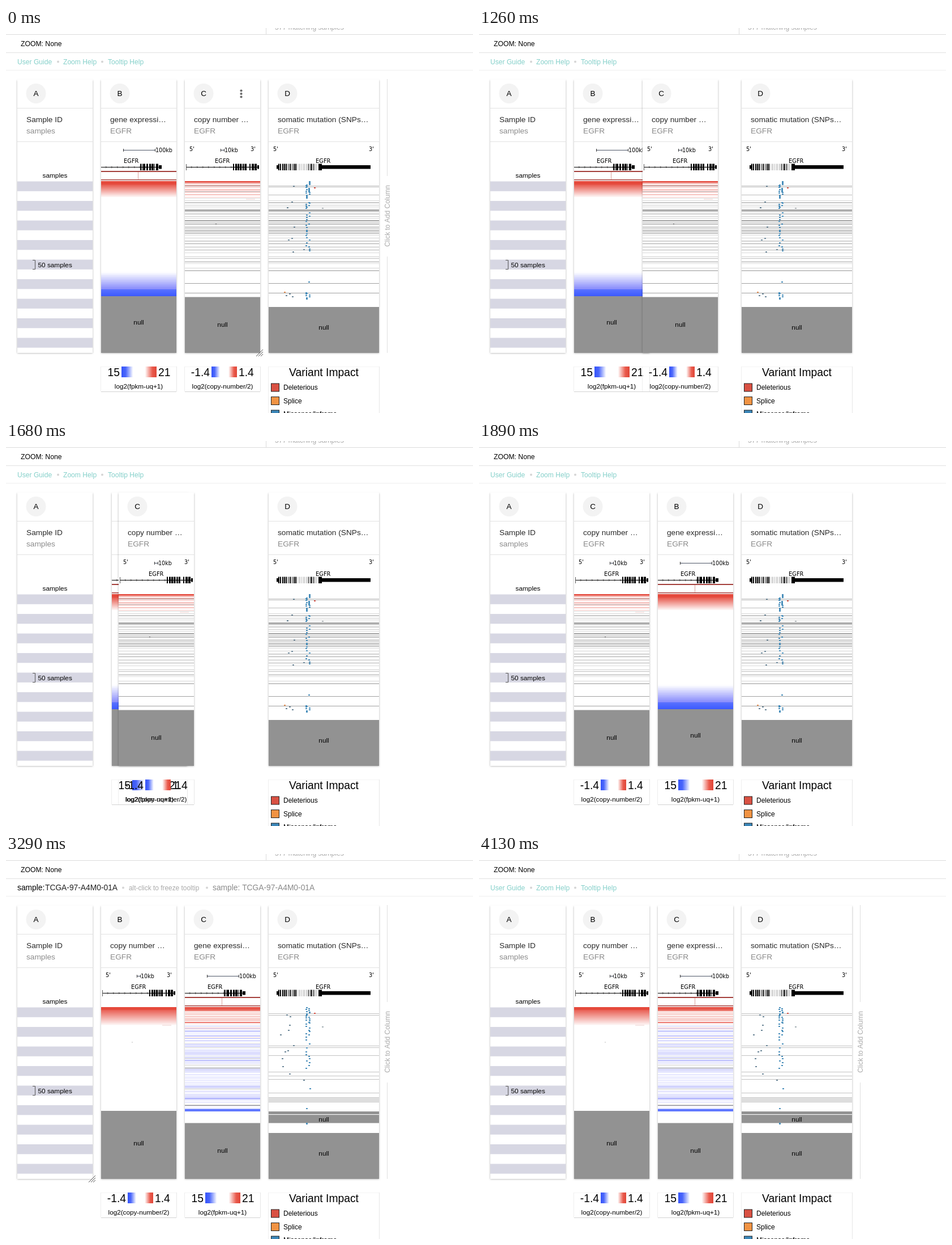
Animation, 825 px wide and 679 px high, one loop 4200 ms. Source, as an HTML page with a canvas:

```html
<!DOCTYPE html>
<html lang="en">
<head>
<meta charset="utf-8">
<title>Column reorder</title>
<style>
html, body { margin: 0; width: 100%; height: 100%; overflow: hidden; background: #fff; }
canvas { display: block; }
</style>
</head>
<body>
<canvas id="stage" width="825" height="679"></canvas>
<script>
const ctx = document.getElementById('stage').getContext('2d');
const LOOP = 4200, STEP = 70;
const DRAG = 1050, DROP = 1820, SORTED = 3150, TIP_ON = 3220, TIP_OFF = 3570;
const UI = '"Liberation Sans", Arial, sans-serif';
const TRACK = '"DejaVu Sans", Verdana, sans-serif';
const TOP = 270, BOTTOM = 573;
const NULL = '#929292';
const RED = [229, 73, 60], BLUE = [56, 86, 255], LILAC = [72, 78, 250], GRAY = [120, 120, 120];

function rect(x, y, w, h, color) {
  ctx.fillStyle = color;
  ctx.fillRect(x, y, w, h);
}

function text(s, x, y, size, color = '#000', align = 'left', font = UI) {
  ctx.font = `${size}px ${font}`;
  ctx.textAlign = align;
  ctx.fillStyle = color;
  ctx.fillText(s, x, y);
}

function dot(x, y, r, color) {
  ctx.fillStyle = color;
  ctx.beginPath();
  ctx.arc(x, y, r, 0, 7);
  ctx.fill();
}

function path(points, color, width = 1) {
  ctx.strokeStyle = color;
  ctx.lineWidth = width;
  ctx.beginPath();
  points.forEach(([x, y]) => ctx.lineTo(x, y));
  ctx.stroke();
}

function random(seed) {
  seed *= 7919;
  return () => (seed = seed * 16807 % 2147483647) / 2147483647;
}

// Mix of white and an rgb colour
const tint = (rgb, k) => `rgb(${rgb.map(c => Math.round(255 + (c - 255) * k))})`;

function fade(w, from, to, rgb, k0, k1, step) {
  for (let y = from; y < to; y += step)
    rect(0, y, w, Math.min(step, to - y), tint(rgb, k0 + (k1 - k0) * (y - from) / (to - from)));
}

// One-pixel rows at random gaps; style(y, rnd) gives the colour
function randomRows(w, from, to, gap, seed, style) {
  const rnd = random(seed);
  for (let y = from; y < to; y += 1 + Math.round(rnd() * gap)) rect(0, y, w, 1, style(y, rnd));
}

function nullBlock(w, y, middle, end = BOTTOM) {
  rect(0, y, w, end - y, NULL);
  text('null', w / 2, middle + 4, 11.8, '#000', 'center');
}

function card(x, w, letter, title, sub) {
  ctx.save();
  ctx.shadowColor = 'rgba(0,0,0,.32)';
  ctx.shadowBlur = 3;
  ctx.shadowOffsetY = 1;
  rect(x, 90.5, w, BOTTOM - 90.5, '#fff');
  ctx.restore();
  rect(x, 141, w, 1, '#e2e2e2');
  rect(x, 200, w, 1, '#e2e2e2');
  dot(x + 33, 115.5, 17.5, '#f3f3f3');
  text(letter, x + 33, 120, 13.5, '#000', 'center');
  text(title, x + 16, 166, 13.7, '#2a2a2a');
  text(sub, x + 16, 186, 13.7, '#8a8a8a');
}

function handle(x) {
  [12, 8, 4].forEach(d => path([[x + 6 - d, 579], [x + 6, 579 - d]], '#555'));
}

function scaleBar(x, end, label) {
  path([[x, 215.5], [end, 215.5]], '#4d5668');
  [x + .5, end - .5].forEach(e => path([[e, 213], [e, 218]], '#333'));
  text(label, end, 219, 9.6, '#000', 'left', TRACK);
}

function ends(w) {
  text("5'", 8, 217, 9.8, '#000', 'left', TRACK);
  text("3'", w - 17, 217, 9.8, '#000', 'left', TRACK);
}

function intron(from, to) {
  rect(from, 245, to - from, 1, '#000');
  for (let x = from + 10; x < to - 3; x += 10)
    path([[x - 2, 243.5], [x, 245.5], [x - 2, 247.5]], '#333', .8);
}

function exons(from, to, width, seed, color = '#000') {
  const rnd = random(seed);
  for (let x = from; x < to;) {
    const w = 1 + Math.floor(rnd() * width);
    rect(x, 239.5, Math.min(w, to - x), 11.5, color);
    x += w + 1 + Math.floor(rnd() * 2);
  }
}

const utr = (x, w) => rect(x, 242, w, 6.5, '#000');

function geneLabel(x) {
  text('EGFR', x, 237.5, 9.9, '#000', 'left', TRACK);
}

function legendBox(x, w, bottom) {
  rect(x, 597, w, 1, '#f4f4f4');
  rect(x - 1, 597, 1, bottom - 597, '#eee');
  rect(x + w, 597, 1, bottom - 597, '#e6e6e6');
  rect(x, bottom, w, 1, '#d2d2d2');
}

function colorLegend(x, low, high, from, to, unit) {
  legendBox(x, 133, 641);
  const g = ctx.createLinearGradient(x + from, 0, x + to, 0);
  [[0, '#3655fa'], [.12, '#4a66fb'], [.33, '#fff'], [.67, '#fff'], [.88, '#ea5a4c'], [1, '#df4638']]
    .forEach(([p, c]) => g.addColorStop(p, c));
  rect(x + from, 597, to - from, 19, g);
  text(low, x + from - 3, 614, 19.3, '#000', 'right');
  text(high, x + to + 3, 614, 19.3);
  text(unit, x + 66.5, 636, 11.7, '#000', 'center');
}

// Draws column content in card coordinates, clipped to the card
function inside(x, w, content) {
  ctx.save();
  ctx.beginPath();
  ctx.rect(x, 201, w, BOTTOM - 201);
  ctx.clip();
  ctx.translate(x, 0);
  content(w);
  ctx.restore();
}

function sampleColumn() {
  card(20, 133, 'A', 'Sample ID', 'samples');
  text('samples', 86.5, 263.5, 11.8, '#000', 'center');
  for (let i = 0; i < 9; i++) rect(20, 270.5 + i * 34.5, 133, 17.3, '#d7d7e3');
  path([[47, 409.5], [51.5, 409.5], [51.5, 425.5], [47, 425.5]], '#555');
  text('50 samples', 56.5, 421.5, 11.8);
}

function expression(x, letter, sorted) {
  card(x, 133, letter, 'gene expressi…', 'EGFR');
  inside(x, 133, w => {
    scaleBar(39, 96, '100kb');
    geneLabel(40);
    intron(0, 104);
    exons(69, 102, 4, 5);
    utr(102, 5);
    rect(0, 252, w, 2, '#a5403c');
    rect(65, 254, 1, 13, '#dba09c');
    rect(0, 267, w, 1.5, '#a5403c');
    if (sorted) {
      fade(w, TOP, 277, RED, 1, .7, 2);
      randomRows(w, 278, 302, 3, 8, (y, rnd) => tint(RED, .2 + .4 * rnd()));
      rect(0, 296, w, 2, tint(RED, .75));
      randomRows(w, 303, 448, 3, 12, (y, rnd) => {
        const rgb = rnd() < .1 ? GRAY : rnd() < (340 - y) / 90 ? RED : LILAC;
        return tint(rgb, .1 + .35 * rnd());
      });
      [312, 364, 410, 431].forEach(y => rect(0, y, w, 1, tint(LILAC, .6)));
      [377, 443].forEach(y => rect(0, y, w, 1, NULL));
      rect(0, 449.5, w, 4.5, tint(BLUE, .8));
      nullBlock(w, 474.5, 522.5);
    } else {
      rect(0, TOP, w, 6, tint(RED, 1));
      fade(w, 276, 298, RED, .88, 0, 2);
      fade(w, 430, 461, LILAC, .02, .7, 3);
      fade(w, 461, 473, BLUE, .85, 1, 3);
      nullBlock(w, 473, 519);
    }
  });
  colorLegend(x, '15', '21', 36, 98, 'log2(fpkm-uq+1)');
}

// Rows of samples without data, thinning out downwards
function missingRows(w) {
  randomRows(w, 304, 392, 4, 21, (y, rnd) => tint(GRAY, .15 + .5 * rnd()));
  randomRows(w, 396, 430, 10, 4, (y, rnd) => tint(GRAY, .2 + .3 * rnd()));
  [320, 322, 339, 340, 346, 357, 362, 380, 412, 450, 467].forEach(y => rect(0, y, w, 1, tint(GRAY, .7)));
}

function copyNumber(x, letter, sorted) {
  card(x, 133, letter, 'copy number …', 'EGFR');
  inside(x, 133, w => {
    ends(w);
    scaleBar(63, 70, '10kb');
    geneLabel(53);
    rect(2, 240, 1, 11, '#555');
    intron(3, 130);
    exons(85, 110, 3, 9);
    exons(114, 128, 4, 6);
    utr(128, 3);
    if (sorted) {
      rect(0, TOP, w, 5, tint(RED, 1));
      fade(w, 275, 302, RED, .85, 0, 2);
      rect(54, 331.5, 2, 1, '#bbb');
      nullBlock(w, 453, 509.5);
    } else {
      rect(0, TOP, w, 3, tint(RED, .95));
      randomRows(w, 274, 302, 3, 15, (y, rnd) => tint(rnd() < .2 ? GRAY : RED, (310 - y) / 60 + .15 * rnd()));
      missingRows(w);
      rect(54, 345, 2, 1, '#888');
      nullBlock(w, 474.5, 523);
    }
    rect(108, 301.5, 16, 1, '#eed0cd');
  });
  colorLegend(x, '-1.4', '1.4', 47, 92, 'log2(copy-number/2)');
}

const SPOT = '#4a8fbb', DULL = '#6d8798', HOT = '#d55348', WARM = '#e6945a';
const mark = (x, y, color = SPOT) => rect(x, y, 3, 2, color);

// Marks in the two crowded lanes, between from and to
function hotSpots(from, to, gap, seed) {
  const rnd = random(seed);
  for (let y = from; y < to; y += gap * (.5 + rnd()))
    mark((rnd() < .5 ? 65 : 70) + Math.floor(rnd() * 2), Math.round(y));
}

// Lone marks left of the lanes
function scatter(count, from, to, seed) {
  const rnd = random(seed);
  for (let i = 0; i < count; i++)
    mark(20 + Math.floor(rnd() * 26), Math.round(from + (to - from) * (i + rnd()) / count), DULL);
}

function mutation(sorted) {
  const x = 464;
  card(x, 195, 'D', 'somatic mutation (SNPs…', 'EGFR');
  inside(x, 195, w => {
    ends(w - 1);
    geneLabel(83);
    utr(14, 5);
    exons(17, 50, 2, 14);
    exons(50, 70, 1, 3, '#b5b5b5');
    exons(70, 80, 2, 7);
    exons(80, 87, 1, 2, '#b5b5b5');
    rect(88, 239.5, 6, 11.5, '#000');
    utr(93, 87);
    if (sorted) {
      [281, 284, 338, 341, 355, 384, 391, 397, 421].forEach(y => rect(0, y, w, 1, tint(GRAY, .45)));
      randomRows(w, 429, 440, 3, 5, () => tint(GRAY, .5));
      rect(0, 454, w, 5, NULL);
      nullBlock(w, 460, 468, 474.5);
      hotSpots(TOP, 294, 1.4, 37);
      hotSpots(296, 322, 2.5, 11);
      hotSpots(327, 378, 5, 17);
      hotSpots(448, 449, 1, 4);
      hotSpots(474, 476, 1, 6);
      scatter(11, 274, 390, 23);
      mark(61, 398, DULL);
      mark(72, 413);
      mark(80, 280, HOT);
      mark(94, 304, '#a5b0b5');
    } else {
      [278, 280, 294].forEach(y => rect(0, y, w, 1, tint(GRAY, .5)));
      missingRows(w);
      hotSpots(TOP, 300, 1.4, 91);
      hotSpots(307, 318, 1.8, 13);
      hotSpots(325, 392, 3.5, 29);
      hotSpots(466, 477, 1.5, 8);
      scatter(7, 276, 412, 31);
      scatter(3, 467, 475, 10);
      mark(61, 390, DULL);
      mark(70, 447);
      mark(80, 281, HOT);
      mark(94, 317, '#b0b5b8');
      mark(27, 465, WARM);
    }
    nullBlock(w, 492, 527.5);
  });
  legendBox(x, 195, 680);
  text('Variant Impact', 561.5, 614, 19.3, '#000', 'center');
  [['Deleterious', '#d95143'], ['Splice', '#f19343'], ['Missense/Inframe', '#3b86b8']].forEach(([label, color], i) => {
    const y = 626.5 + i * 23.5;
    rect(468, y, 15, 15, '#222');
    rect(469, y + 1, 13, 13, color);
    text(label, 490, y + 11.5, 12);
  });
}

function header(tip) {
  rect(0, 11, 825, 1, '#dcdcdc');
  rect(459, 0, 1, 11, '#dcdcdc');
  text('577 matching samples', 475, 3, 12.2, '#aaa');
  text('ZOOM: None', 26, 31.5, 12.2);
  rect(0, 43, 825, 1, '#e2e2e2');
  rect(0, 74, 825, 1, '#efefef');
  if (tip) {
    const id = 'TCGA-97-A4M0-01A';
    text('sample:', 20, 64, 13.8);
    text(id, 69, 64, 13.8, '#222');
    text('alt-click to freeze tooltip', 217, 63.5, 11.9, '#aaa');
    text('sample: ' + id, 365, 64, 13.8, '#8a8a8a');
  } else {
    [['User Guide', 20], ['Zoom Help', 101], ['Tooltip Help', 180]]
      .forEach(([label, x]) => text(label, x, 63.5, 12.1, '#85d0ca'));
  }
  (tip ? [207, 355] : [92, 170]).forEach(x => dot(x, 59.5, 2, '#d5d5d5'));
}

function addColumn() {
  rect(673, 90, 1, 171, '#e0e0e0');
  rect(673, 403, 1, 170, '#e0e0e0');
  ctx.save();
  ctx.translate(677.5, 331.5);
  ctx.rotate(-Math.PI / 2);
  text('Click to Add Column', 0, 0, 12, '#aaa', 'center');
  ctx.restore();
}

// Piecewise linear value through [time, value] points
function along(t, points) {
  const i = points.findIndex(p => p[0] > t);
  if (i === 0) return points[0][1];
  if (i < 0) return points[points.length - 1][1];
  const [t0, a] = points[i - 1], [t1, b] = points[i];
  return a + (b - a) * (t - t0) / (t1 - t0);
}

const dragX = t => Math.round(along(t, [[DRAG, 316], [1260, 289], [1680, 199], [DROP, 168]]));

function swapX(t) {
  const k = along(t, [[1624, 0], [1874, 1]]);
  return Math.round(168 + 148 * k * k * (3 - 2 * k));
}

function draw(t) {
  const sorted = t >= SORTED, idle = t < DRAG;
  const tip = t >= TIP_ON && t < TIP_OFF;
  rect(0, 0, 825, 679, '#fff');
  header(tip);
  sampleColumn();
  mutation(sorted);
  expression(swapX(t), sorted ? 'C' : 'B', sorted);
  copyNumber(dragX(t), sorted ? 'B' : 'C', sorted);
  if (idle) {
    [110.5, 116, 121.5].forEach(y => dot(415.5, y, 2.1, '#6a6a6a'));
    handle(448);
  }
  if (tip) handle(152);
  if (idle || sorted) addColumn();
}

function tick(now) {
  draw(Math.floor(now % LOOP / STEP) * STEP);
  requestAnimationFrame(tick);
}
requestAnimationFrame(tick);
</script>
</body>
</html>
```
